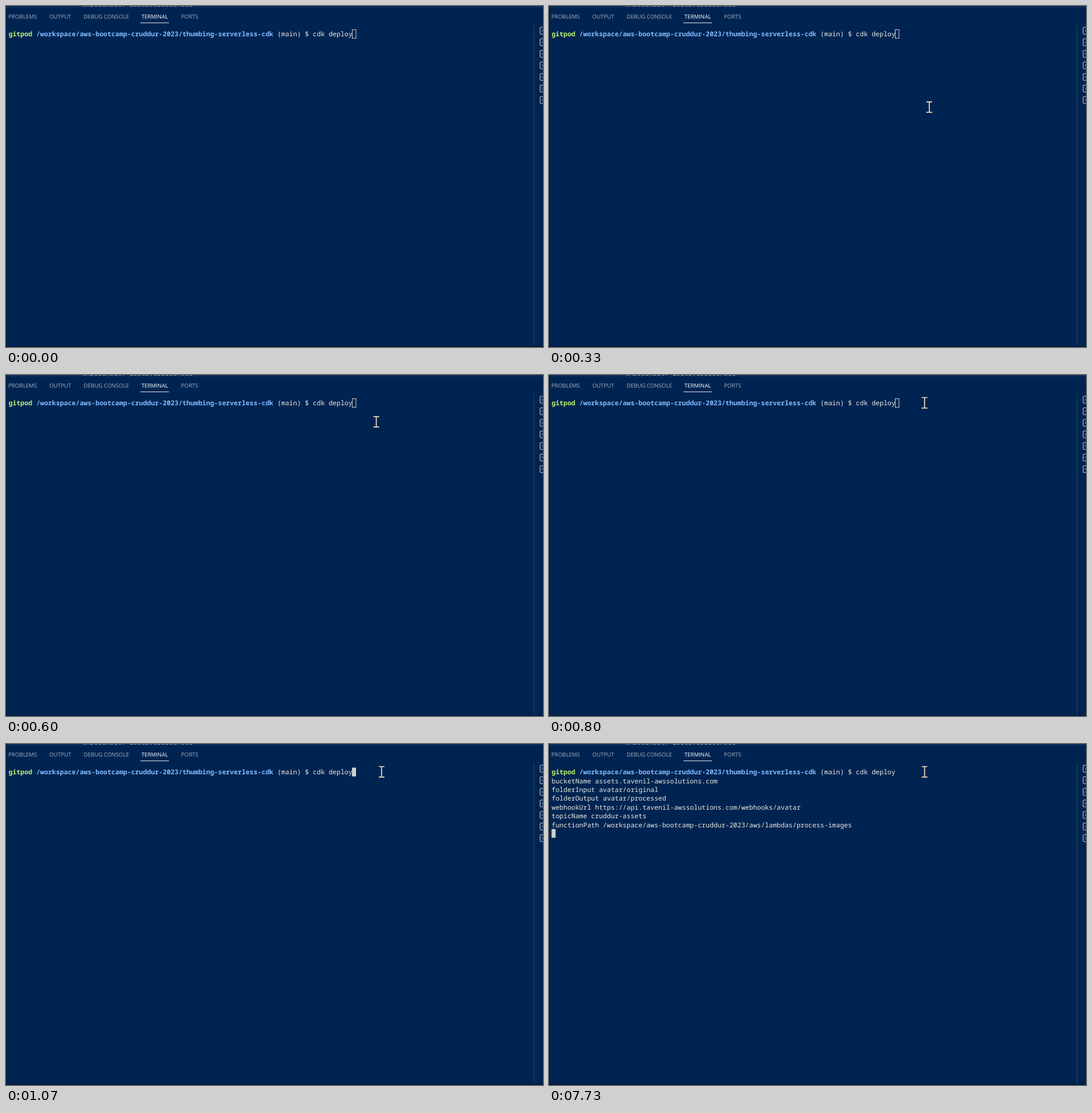
These frames come from a looping animation (939x597 px, 8000 ms). An HTML page:

```html
<!DOCTYPE html>
<html lang="en">
<head>
<meta charset="utf-8">
<title>Terminal</title>
<style>
  html, body { margin: 0; width: 100%; height: 100%; overflow: hidden; background: #002451; }
  svg { display: block; width: 939px; height: 597px; }
  text { white-space: pre; text-rendering: geometricPrecision; }
  .mono { font: 11.52px "Noto Sans Mono", "DejaVu Sans Mono", monospace; fill: #ebe9e4; }
  .tab { font: 9.7px "Open Sans", "Noto Sans", sans-serif; fill: #a3b0c0; }
  .active { fill: #fff; }
  .bold { font-weight: 700; }
  .user { fill: #b8f171; }
  .path { fill: #80baff; }
</style>
</head>
<body>
<svg viewBox="0 0 939 597">
  <defs>
    <clipPath id="edge"><rect width="939" height="1"/></clipPath>
    <g id="icon" fill="none" stroke="#c3cad4">
      <path d="M940 -6H935.5Q934 -6 934 -4.5V4.5Q934 6 935.5 6H940" stroke-width="1.1"/>
      <path d="M937 -2L939 0L937 2" stroke-width=".8"/>
    </g>
  </defs>
  <rect width="939" height="597" fill="#002451"/>

  <g clip-path="url(#edge)" opacity=".75">
    <text class="mono" x="133" y="1">throughput, isServerlessMode</text>
  </g>
  <rect y="1" width="939" height="1" fill="#1b3963"/>
  <rect y="595.5" width="939" height="1.5" fill="#001733"/>
  <rect width="1" y="2" height="594" fill="#001d44"/>
  <rect x="923" y="33" width="1" height="562" fill="#28436d"/>

  <g id="tabs"></g>
  <rect x="235" y="29" width="50" height="1" fill="#e4e8ee"/>
  <g id="icons"></g>

  <text class="mono" x="4.5" y="53.4"><tspan class="bold user">gitpod</tspan> <tspan class="bold path">/workspace/aws-bootcamp-cruddur-2023/thumbing-serverless-cdk</tspan> (main) $ cdk deploy</text>
  <g id="output"></g>

  <rect id="hollow" x="605.5" y="41.5" width="6.5" height="15" fill="none" stroke="#d0d0d0"/>
  <rect id="block" width="7" height="15.3" fill="#d0d0d0"/>
  <circle id="click" cx="654" cy="48" r="14" fill="#ff0" fill-opacity=".47"/>
  <path id="mouse" d="M-5 -9.2H-1.2L0 -8.5L1.2 -9.2H5M0 -8.5V8.5M-5 9.2H-1.2L0 8.5L1.2 9.2H5"
        fill="none" stroke="#f8e2bf" stroke-width="1.7"/>
</svg>
<script>
const LOOP = 8000, ROW = 15.35, TOP = 41.4, BASE = 53.4;
const FOCUS = 870, RELEASE = 1070, ENTER = 1600, PRINT = 7730;

const tabs = [[4, "PROBLEMS"], [75.7, "OUTPUT"], [135.7, "DEBUG CONSOLE"], [236.7, "TERMINAL"], [306, "PORTS"]];
const output = [
  "bucketName assets.tavenil-awssolutions.com",
  "folderInput avatar/original",
  "folderOutput avatar/processed",
  "webhookUrl https://api.tavenil-awssolutions.com/webhooks/avatar",
  "topicName cruddur-assets",
  "functionPath /workspace/aws-bootcamp-cruddur-2023/aws/lambdas/process-images"
];
// time, x, y of the pointer
const moves = [
  [130, 873, 573], [200, 748, 374], [270, 682, 236], [330, 665, 177],
  [400, 647, 129], [470, 638, 107], [530, 641, 93], [600, 647.5, 82],
  [680, 650.5, 66], [730, 654, 54], [800, 656.7, 48.7]
];

const $ = id => document.getElementById(id);
const show = (id, on) => $(id).setAttribute("visibility", on ? "visible" : "hidden");
const place = (id, x, y) => $(id).setAttribute("transform", `translate(${x} ${y})`);

function add(parent, tag, attrs, content = "") {
  const el = document.createElementNS("http://www.w3.org/2000/svg", tag);
  for (const key in attrs) el.setAttribute(key, attrs[key]);
  el.textContent = content;
  $(parent).append(el);
}

for (const [x, label] of tabs)
  add("tabs", "text", { x, y: 21.6, class: label === "TERMINAL" ? "tab active" : "tab" }, label);
output.forEach((line, i) =>
  add("output", "text", { x: 4.5, y: BASE + ROW * (i + 1), class: "mono" }, line));
for (let i = 0; i < 7; i++)
  add("icons", "use", { href: "#icon", y: 43.3 + 20.25 * i });

function draw(t) {
  const move = moves.findLast(m => m[0] <= t);
  show("mouse", move);
  if (move) place("mouse", move[1], move[2]);

  show("hollow", t < FOCUS);
  show("click", t >= FOCUS && t < RELEASE);
  show("block", t >= FOCUS);
  const row = t >= PRINT ? output.length + 1 : t >= ENTER ? 1 : 0;
  place("block", row ? 4.5 : 605, TOP + ROW * row);
  show("output", t >= PRINT);
}

const start = performance.now();
function tick() {
  draw((performance.now() - start) % LOOP);
  requestAnimationFrame(tick);
}
tick();
</script>
</body>
</html>
```
